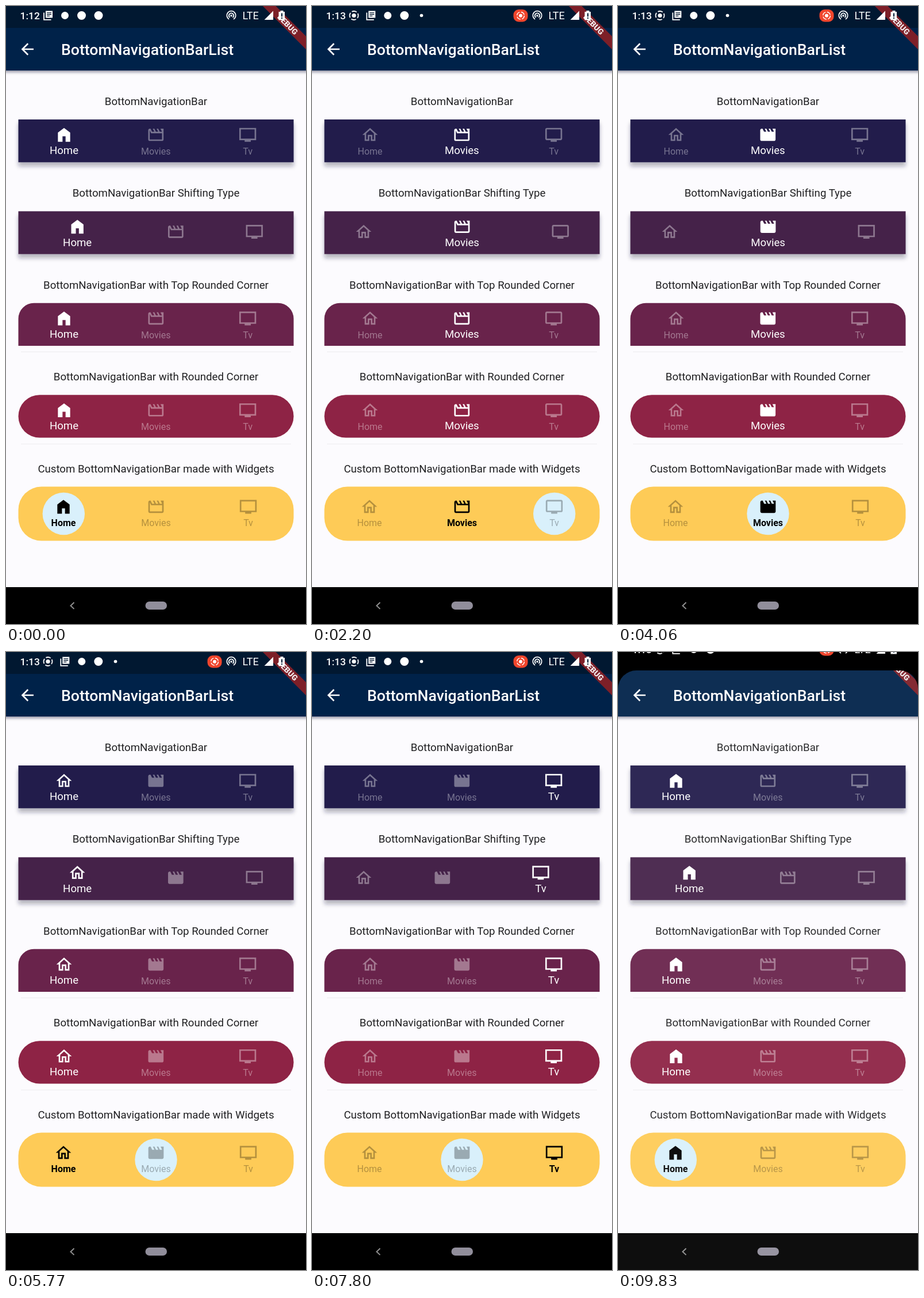
An HTML page that plays this animation: 522x1073 px, repeating every 9.88 s.

```html
<!DOCTYPE html>
<html lang="en">
<head>
<meta charset="utf-8">
<title>Bottom navigation bars</title>
<style>
html, body { margin: 0; width: 100%; height: 100%; overflow: hidden; background: #fcfbfe; }
svg { display: block; width: 100%; height: 100%; font-family: Roboto, sans-serif; }
</style>
</head>
<body>
<svg id="stage" viewBox="0 0 522 1073" xmlns="http://www.w3.org/2000/svg"></svg>
<script>
const LOOP = 9880;
const PITCH = 159.4;
const NAMES = ['Home', 'Movies', 'Tv'];
const STRIPS = 'l2 4h-3l-2-4h-2l2 4h-3l-2-4H8l2 4H7L5 4H4c-1.1 0-2 .9-2 2v12c0 1.1.9 2 2 2h16c1.1 0 2-.9 2-2V4';
// [idle, selected]
const ICONS = [
  ['M12 5.69l5 4.5V18h-2v-6H9v6H7v-7.81l5-4.5M12 3L2 12h3v8h6v-6h2v6h6v-8h3z',
   'M4 21V9l8-6 8 6v12h-6v-7h-4v7z'],
  ['M4 6.47L5.76 10H20v8H4zM22 4h-4' + STRIPS + 'z',
   'M18 4' + STRIPS + 'h-4z'],
  ['M23 3H1v16h7v2h8v-2h7zM21 17H3V5h18z',
   'M21 3H3c-1.1 0-2 .9-2 2v12c0 1.1.9 2 2 2h5v2h8v-2h5c1.1 0 2-.9 2-2V5c0-1.1-.9-2-2-2zM21 17H3V5h18z']
];
const TITLES = [
  'BottomNavigationBar',
  'BottomNavigationBar Shifting Type',
  'BottomNavigationBar with Top Rounded Corner',
  'BottomNavigationBar with Rounded Corner',
  'Custom BottomNavigationBar made with Widgets'
];
const COLORS = ['#211f4c', '#45224a', '#69234b', '#8e2345', '#fecb57'];
// start, chosen tab, delay before the labels follow
const TAPS = [[0, 0, 0], [820, 1, 0], [2200, 2, 160], [3570, 1, 0], [4670, 0, 0],
  [5770, 1, 0], [6810, 2, 0], [7800, 1, 0], [8730, 0, 0]];

const stage = document.getElementById('stage');
const $ = id => document.getElementById(id);
const clamp = x => Math.max(0, Math.min(1, x));
const mix = (a, b, p) => a + (b - a) * p;
const smooth = p => p * p * (3 - 2 * p);
const set = (el, attrs) => { for (const k in attrs) el.setAttribute(k, attrs[k]); };

function barShape(i) {
  const y = 197 + PITCH * i;
  if (i === 2) return `<path d="M21.5 ${y + 74.3}V${y + 27}a27 27 0 0 1 27-27H473.5a27 27 0 0 1 27 27V${y + 74.3}z" fill="${COLORS[i]}"/>`;
  const h = i === 4 ? 94 : 74.3;
  const r = [0, 0, 0, 37.1, 40][i];
  return `<rect x="21.5" y="${y}" width="479" height="${h}" rx="${r}" fill="${COLORS[i]}"${i < 2 ? ' filter="url(#lift)"' : ''}/>`;
}

function bar(i) {
  const items = NAMES.map((n, k) =>
    `<g id="i${i}${k}"><path fill-rule="evenodd"/><text text-anchor="middle">${n}</text></g>`).join('');
  return `<text x="261" y="${172 + PITCH * i}" font-size="18.65" text-anchor="middle" fill="#202022">${TITLES[i]}</text>`
    + barShape(i) + (i === 4 ? '<circle id="spot" cy="881.5" r="36.7" fill="#d9f0fb"/>' : '') + items;
}

stage.innerHTML = `
<defs>
  <filter id="lift" x="-10%" y="-30%" width="120%" height="180%">
    <feDropShadow dx="0" dy="7" stdDeviation="3.5" flood-color="#222238" flood-opacity=".32"/>
  </filter>
  <filter id="low" x="-5%" y="-10%" width="110%" height="140%">
    <feDropShadow dx="0" dy="3" stdDeviation="2.5" flood-color="#111122" flood-opacity=".4"/>
  </filter>
</defs>
<rect width="522" height="1073" fill="#fcfbfe"/>
<rect x="-10" width="542" height="112" fill="#00204a" filter="url(#low)"/>
<rect id="top" width="522" height="38" fill="#011831"/>
<path d="M20 11H7.83l5.59-5.59L12 4l-8 8 8 8 1.41-1.41L7.83 13H20z" transform="translate(21.3 59) scale(1.333)" fill="#fff"/>
<text x="96" y="85" font-size="26.6" font-weight="500" fill="#fff">BottomNavigationBarList</text>
${TITLES.map((_, i) => bar(i)).join('')}
<path d="M26 600.5H496M26 760.5H496" stroke="#000" stroke-opacity=".06"/>
<g transform="translate(522 0) rotate(45)">
  <rect x="-80" y="37.2" width="160" height="16" fill="#7d1f28"/>
  <text y="50" font-size="13.6" font-weight="900" text-anchor="middle" fill="#fff" fill-opacity=".9">DEBUG</text>
</g>
<rect y="1009" width="522" height="64" fill="#000"/>
<path d="M118.5 1035.5l-6 5.7 6 5.7" fill="none" stroke="#8f8f8f" stroke-width="2"/>
<rect x="242.5" y="1034" width="37.5" height="14" rx="7" fill="#918e9b"/>
<rect id="veil" width="522" height="1073" fill="#fff"/>
<path id="shade"/>
<g id="status" fill="#fff">
  <text id="clock" x="24.5" y="22.5" font-size="17.4" font-weight="500"></text>
  <g id="rec" fill="none" stroke="#fff" stroke-width="1.8">
    <circle cx="73" cy="16.5" r="7.5" stroke-dasharray="8.8 3" stroke-dashoffset="4"/>
    <circle cx="73" cy="16.5" r="3.6" fill="#fff" stroke="none"/>
  </g>
  <g id="notes">
    <path d="M69 8.5h12v12H69z"/>
    <path d="M66 11.5v12.3h12.5" fill="none" stroke="#fff" stroke-width="1.8"/>
    <path d="M71 11.7h8M71 14.5h8M71 17.3h5" stroke="#011831" stroke-width="1.3"/>
    <circle cx="102.5" cy="16.5" r="6.5"/>
    <circle cx="131.5" cy="16.5" r="7.5"/>
  </g>
  <circle id="last" cx="161" cy="16.5" r="7.5"/>
  <circle id="more" cx="190.5" cy="16.5" r="2.8"/>
  <g id="chip">
    <rect x="350.5" y="6" width="25" height="21.5" rx="9" fill="#f0452c"/>
    <circle cx="363" cy="16.7" r="6.3" fill="none" stroke="#fff" stroke-width="1.5" stroke-dasharray="7.4 2.5"/>
    <circle cx="363" cy="16.7" r="3"/>
  </g>
  <g fill="none" stroke="#fff" stroke-width="1.8">
    <path d="M388 23a7.7 7.7 0 1 1 8 0"/>
    <path d="M389.5 20a4.2 4.2 0 1 1 5 0"/>
    <circle cx="392" cy="16.7" r="1.8" fill="#fff" stroke="none"/>
  </g>
  <text x="411.5" y="22.8" font-size="18">LTE</text>
  <path d="M465 8.5v15.5h-15.5z"/>
  <path d="M477.500 10V8h5v2h2.500v14.500h-10.500V10z"/>
  <path d="M480 12.500v6M480 20v2" stroke="#011831" stroke-width="2"/>
</g>`;

const cells = TITLES.map((_, i) => NAMES.map((_, k) => {
  const [icon, label] = $('i' + i + k).children;
  return { icon, label };
}));

function place(cell, x, iconY, textY, size) {
  set(cell.icon, { transform: `translate(${x - 16} ${iconY - 16}) scale(1.333)` });
  set(cell.label, { x, y: textY, 'font-size': size });
}

function drawBars(t) {
  let n = TAPS.length - 1;
  while (TAPS[n][0] > t) n--;
  const [start, now, lag] = TAPS[n];
  const was = n ? TAPS[n - 1][1] : now;
  const age = t - start;
  const p = smooth(clamp((age - lag) / 155));
  const q = smooth(clamp((age - 200) / 290));
  const weigh = (k, f) => (k === now ? f : 0) + (k === was ? 1 - f : 0);
  let left = 21.5;

  NAMES.forEach((_, k) => {
    const w = weigh(k, p);
    const span = 136.9 * (1 + w / 2);
    const mid = left + span / 2;
    left += span;
    const d = ICONS[k][k === now ? 1 : 0];

    cells.forEach((row, i) => {
      const cell = row[k];
      const dy = PITCH * i;
      set(cell.icon, { d });
      if (i === 4) {
        const c = weigh(k, q);
        place(cell, [100, 261, 421.5][k], 869.5, 902.5, 16);
        const tint = { fill: '#000', 'fill-opacity': mix(0.29, 1, c) };
        set(cell.icon, tint);
        set(cell.label, { ...tint, 'font-weight': c > 0.5 ? 700 : 400 });
        return;
      }
      const shifting = i === 1;
      const x = shifting ? mid : 101 + 159.8 * k;
      const iconY = shifting ? mix(392, 383.3, w) : 223.7 + dy;
      place(cell, x, iconY, mix(257.8, 257.2, w) + dy, mix(16, 18.65, w));
      const alpha = mix(0.39, 1, w);
      set(cell.icon, { fill: '#fff', 'fill-opacity': alpha });
      set(cell.label, { fill: '#fff', 'fill-opacity': shifting ? w : alpha });
    });
  });
  set($('spot'), { cx: [100.3, 261, 421.7][now] });
}

function drawStatus(t) {
  const p = smooth(clamp((t - 50) / 500));
  $('clock').textContent = t < 1700 ? '1:12' : '1:13';
  set($('rec'), { opacity: p });
  set($('notes'), { transform: `translate(${29.3 * p} 0)` });
  set($('last'), { opacity: 1 - p });
  set($('more'), { opacity: p });
  set($('chip'), { opacity: p });

  const s = t < 9720 ? 0 : clamp((t - 9670) / 160);
  const h = 32 * s, r = 32 * s;
  set($('shade'), { d: s ? `M0 0H522V${h + r}A${r} ${r} 0 0 0 ${522 - r} ${h}H${r}A${r} ${r} 0 0 0 0 ${h + r}z` : '' });
  set($('status'), { transform: `translate(0 ${-21 * s})` });
  set($('veil'), { opacity: 0.055 * s });
  set($('top'), { opacity: 1 - s });
}

function draw(t) {
  drawBars(t);
  drawStatus(t);
}

const began = performance.now();
function tick() {
  draw((performance.now() - began) % LOOP);
  requestAnimationFrame(tick);
}
tick();
</script>
</body>
</html>
```
